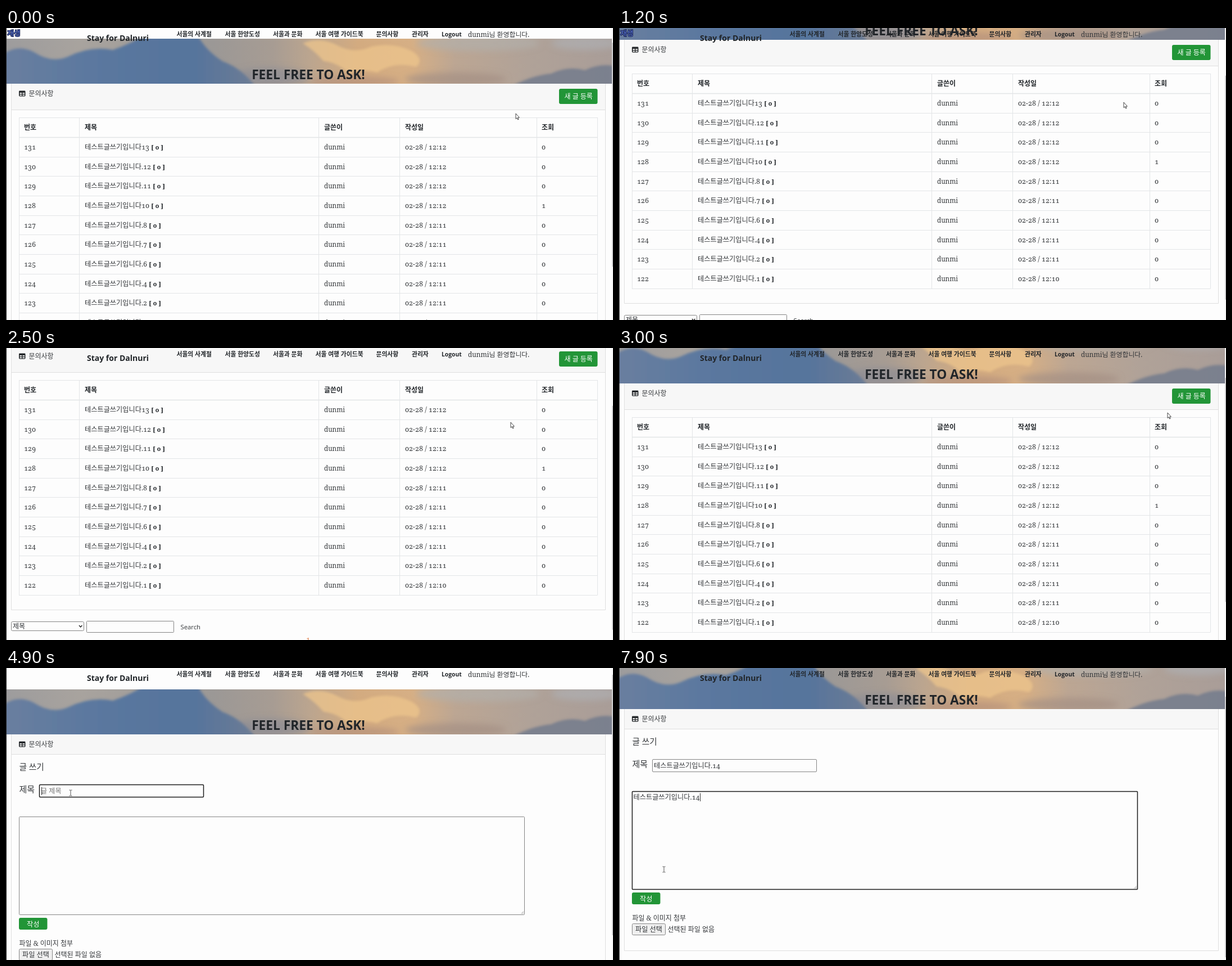
Write an HTML page that moves like this. It is 1080 px wide and 519 px high and loops after 8000 ms.

```html
<!DOCTYPE html>
<html lang="ko">
<head>
<meta charset="utf-8">
<title>문의사항</title>
<style>
  html, body { margin: 0; width: 100%; height: 100%; overflow: hidden; background: #fdfdfd; }
  svg { display: block; width: 100%; height: 100%; }
  text { fill: #34373a; font: 12.2px "Noto Serif", "Noto Sans CJK KR", serif; font-variant-numeric: oldstyle-nums; }
  .sans { font-family: "Open Sans", "Noto Sans CJK KR", sans-serif; }
  .bold { font-weight: 700; fill: #212529; }
  .white { fill: #fff; }
  .hint { fill: #757575; }
  .accent { fill: #e0733a; }
  .line { stroke: #e3e5e7; fill: none; }
  .card { stroke: #dfdfdf; fill: none; }
  .field { stroke: #858585; fill: #fdfdfd; }
  .focus { stroke: #1c1c1c; stroke-width: 1.5; }
  .button { fill: #229537; }
</style>
</head>
<body>
<svg id="stage" viewBox="0 0 1080 519">
  <defs>
    <linearGradient id="sky">
      <stop offset="0" stop-color="#9d9c9d"/><stop offset=".12" stop-color="#a8a39e"/>
      <stop offset=".34" stop-color="#9b9896"/><stop offset=".44" stop-color="#a79c93"/>
      <stop offset=".5" stop-color="#bba58f"/><stop offset=".58" stop-color="#d3ab80"/>
      <stop offset=".67" stop-color="#d6af85"/><stop offset=".74" stop-color="#bca693"/>
      <stop offset=".86" stop-color="#b0a298"/><stop offset="1" stop-color="#a99d98"/>
    </linearGradient>
    <linearGradient id="blue">
      <stop offset="0" stop-color="#6a7f9f"/><stop offset=".35" stop-color="#5b789f"/>
      <stop offset=".75" stop-color="#56749c"/><stop offset="1" stop-color="#6d7c94"/>
    </linearGradient>
    <filter id="soft" x="-30%" y="-60%" width="160%" height="220%"><feGaussianBlur stdDeviation="6"/></filter>
    <filter id="edge"><feGaussianBlur stdDeviation="2"/></filter>
    <clipPath id="heroBox"><rect x="1" y="38" width="1077" height="80"/></clipPath>
  </defs>
  <g id="list"></g>
  <g id="write"></g>
  <g id="nav"></g>
  <rect width="1" height="519" fill="#222"/>
  <rect x="1078" width="2" height="519" fill="#f1f1f1"/>
  <rect id="thumb" x="1078.5" width="1.5" fill="#bfc0c2"/>
  <path id="arrow" d="M0 0V9.6L2.2 7.7L3.7 11L5.1 10.4L3.7 7.2H6.4Z" fill="#fff" stroke="#333" stroke-width=".9"/>
  <path id="beam" d="M-2.5 -5H-.6L0 -4.4L.6 -5H2.5M0 -4.4V4.4M-2.5 5H-.6L0 4.4L.6 5H2.5" fill="none" stroke="#555"/>
</svg>
<script>
const LOOP = 8000, STEP = 100, SWITCH = 3400;
const $ = id => document.getElementById(id);

const text = (x, y, str, size = 12, cls = "", extra = "") =>
  `<text x="${x}" y="${y}" class="${cls}" style="font-size:${size}px" ${extra}>${str}</text>`;
const box = (x, y, w, h, cls, extra = "") =>
  `<rect x="${x}" y="${y}" width="${w}" height="${h}" class="${cls}" ${extra}/>`;
const path = (d, cls, extra = "") => `<path d="${d}" class="${cls}" ${extra}/>`;
const cloud = (x, y, rx, ry, fill, opacity = .8) =>
  `<ellipse cx="${x}" cy="${y}" rx="${rx}" ry="${ry}" fill="${fill}" opacity="${opacity}"/>`;

const hero = `<g clip-path="url(#heroBox)">
  ${box(0, 38, 1080, 80, "", 'fill="url(#sky)"')}
  <g transform="translate(0 38)">
    <g filter="url(#soft)">
      ${cloud(470, 68, 70, 16, "#8c8c94", .7)}
      ${cloud(620, 76, 80, 9, "#b28f7c", .7)}
      ${cloud(840, 8, 110, 14, "#b3afaa", .7)}
      ${cloud(800, 72, 90, 12, "#a48f84", .7)}
      ${cloud(1030, 8, 60, 12, "#aeb0b2", .7)}
    </g>
    <g filter="url(#edge)">
      ${path("M-9 30Q20 8 50 24Q80 44 110 32Q150 12 190 20Q225 8 250 -9H340Q352 18 385 40Q420 52 448 90H-9Z", "", 'fill="url(#blue)"')}
      ${path("M528 8Q560 -4 590 12T650 14Q690 6 722 22Q745 36 730 50Q690 40 660 60Q630 52 610 62Q590 42 565 40Q550 22 528 8Z", "", 'fill="#ecc48d" opacity=".75"')}
      ${path("M890 90Q930 66 970 62Q1000 48 1030 56Q1060 42 1090 50V90Z", "", 'fill="#747c8c" opacity=".85"')}
    </g>
  </g></g>
  ${text(538, 110, "FEEL FREE TO ASK!", 22.7, "sans bold", 'text-anchor="middle"')}`;

function card(headEnd, bottom) {
  return box(9.5, 118.5, 1057, headEnd - 118, "", 'fill="#f7f7f7"')
    + path(`M9.5 118V${bottom}H1066.5V118M9.5 ${headEnd + .5}H1066.5`, "card")
    + box(23, 130.5, 11.5, 10, "", 'rx="1.4" fill="#25282b"')
    + path("M24.6 134H28.1V136H24.6ZM29.5 134H33V136H29.5ZM24.6 137.2H28.1V139.2H24.6ZM29.5 137.2H33V139.2H29.5Z", "", 'fill="#f7f7f7"')
    + text(40.5, 139.5, "문의사항");
}

function listPage() {
  const cols = [32, 140, 566, 710, 953];
  const tails = ["13", ".12", ".11", "10", ".8", ".7", ".6", ".4", ".2", ".1"];
  const rowY = i => Math.round(213 + 34.65 * i) + .5;
  let out = hero + card(164, 586.5)
    + box(984, 127, 68.5, 27, "button", 'rx="3"') + text(993.5, 145, "새 글 등록", 12, "white");
  ["번호", "제목", "글쓴이", "작성일", "조회"].forEach((label, i) =>
    out += text(cols[i], 199.5, label, 12, "bold"));
  tails.forEach((tail, i) => {
    const minute = i < 4 ? 12 : i < 9 ? 11 : 10;
    const y = rowY(i) + 21.5;
    const title = `테스트글쓰기입니다${tail} <tspan class="bold" style="font-size:11.2px">[ 0 ]</tspan>`;
    [131 - i, title, "dunmi", `02-28 / 12:${minute}`, i === 3 ? 1 : 0].forEach((cell, c) =>
      out += text(cols[c], y, cell, c === 2 ? 11.7 : 12.2));
    out += path(`M23 ${rowY(i + 1)}H1052.5`, "line");
  });
  out += path("M23 178.5H1052.5" + [23.5, 130.5, 556.5, 700.5, 944.5, 1052.5].map(x => `M${x} 178V560`).join(""), "line");
  out += path("M23 213.5H1052.5", "line", 'stroke-width="1.6"');
  return out
    + box(9.5, 607.5, 129, 16, "field", 'rx="2"') + text(12, 620, "제목")
    + path("M130 614L132.7 617L135.4 614", "", 'fill="none" stroke="#222" stroke-width="1.4"')
    + box(143.5, 606.5, 155, 20, "field", 'rx="1"')
    + text(310.5, 621, "Search", 11.3, "sans", 'font-weight="500"')
    + text(534, 643, "1", 12, "accent");
}

function writePage() {
  return hero + card(153, 547.5)
    + text(23.5, 181, "글 쓰기", 14.7) + text(23.5, 221, "제목", 15)
    + box(59.5, 207.5, 292, 22, "field", 'id="titleBox" rx="1.5"')
    + text(62, 222.5, "글 제목", 12.1, "hint", 'id="hint"')
    + text(62, 222.5, "", 12.2, "", 'id="titleText"')
    + box(23.5, 264.5, 899, 174, "field", 'id="bodyBox" rx="1"')
    + path("M916.5 437L921 432.5M919 437L921 435", "", 'stroke="#888" stroke-width=".8"')
    + text(25.5, 278.5, "", 12.2, "", 'id="bodyText"')
    + box(0, 0, 1, 14.5, "", 'id="caret" fill="#333"')
    + box(23, 444, 50.5, 21, "button", 'rx="3"') + text(37, 460, "작성", 12.2, "white")
    + text(23.5, 494, "파일 &amp; 이미지 첨부")
    + box(23.5, 499.5, 59, 20, "", 'rx="2" fill="#efefef" stroke="#858585"')
    + text(29, 513.5, "파일 선택", 12.2) + text(86.5, 513.5, "선택된 파일 없음", 12);
}

function navBar() {
  const items = [[303.5, "서울의 사계절"], [389.5, "서울 한양도성"], [475, "서울과 문화"], [550.5, "서울 여행 가이드북"],
    [658.5, "문의사항"], [722, "관리자"], [775, "Logout"]];
  return text(144, 23, "Stay for Dalnuri", 14, "sans bold")
    + items.map(([x, label]) => text(x, 15, label, label === "Logout" ? 10.3 : 10.8, "sans bold")).join("")
    + text(822, 16.3, "dunmi님 환영합니다.", 11.9)
    + text(2.5, 14, "재생", 12.5, "sans", 'id="badge" font-weight="700" stroke="#1b2450" stroke-width="2" paint-order="stroke"');
}

$("list").innerHTML = listPage();
$("write").innerHTML = writePage();
$("nav").innerHTML = navBar();
$("badge").style.fill = "#5b78dc";

// Tables of [time, value...]; values in between are linear.
const listScroll = [[0, 19], [300, 42], [600, 72], [900, 86], [1000, 88], [1200, 97], [1700, 122], [2400, 122],
  [2500, 121], [2700, 98], [3000, 55], [3300, 19]];
const writeScroll = [[7400, 0], [7500, 6], [7700, 30], [7800, 40], [7900, 45]];
const pointer = [[0, 907, 152], [1000, 898, 132], [2500, 898, 132], [3000, 976, 115], [3300, 1008, 118],
  [3500, 1008, 118], [4000, 115, 222], [7400, 115, 222], [7900, 80, 358]];

// Tables of [start, value]; each value holds until the next.
const base = "테스트글쓰기입니다.";
const titleSteps = [[0, ""], [5200, base + "4"], [5800, base], [5900, base + "1"], [6000, base + "14"]];
const bodySteps = [[0, ""], [6400, base + "4"], [7000, base], [7100, base + "1"], [7200, base + "14"]];
const focusSteps = [[0, ""], [4200, "title"], [6200, "body"]];
const caretSteps = [[0, 0], [4200, 1], [4500, 0], [4900, 1], [5500, 0], [5800, 1], [6800, 0], [7000, 1]];

function mix(table, t) {
  const i = table.findIndex(row => row[0] > t);
  if (i === 0) return table[0].slice(1);
  if (i < 0) return table[table.length - 1].slice(1);
  const a = table[i - 1], b = table[i], k = (t - a[0]) / (b[0] - a[0]);
  return a.slice(1).map((v, n) => v + (b[n + 1] - v) * k);
}
const hold = (table, t) => table.filter(row => row[0] <= t).pop()[1];
const show = (id, on) => $(id).setAttribute("visibility", on ? "inherit" : "hidden");
const move = (id, x, y) => $(id).setAttribute("transform", `translate(${x} ${y})`);

function draw(t) {
  const writing = t >= SWITCH;
  const scroll = Math.round(mix(writing ? writeScroll : listScroll, t)[0]);
  show("list", !writing);
  show("write", writing);
  move(writing ? "write" : "list", 0, -scroll);
  $("thumb").setAttribute("y", 12 + scroll * (writing ? .87 : .75));
  $("thumb").setAttribute("height", writing ? 463 : 398);
  show("badge", t < 1500);

  const title = hold(titleSteps, t), focus = hold(focusSteps, t);
  $("titleText").textContent = title;
  $("bodyText").textContent = hold(bodySteps, t);
  show("hint", !title);
  for (const name of ["title", "body"]) $(name + "Box").classList.toggle("focus", focus === name);
  show("caret", writing && focus && hold(caretSteps, t));
  if (focus) {
    const field = $(focus + "Text");
    const width = field.textContent ? field.getComputedTextLength() : 0;
    move("caret", Math.round(+field.getAttribute("x") + width + .5), focus === "title" ? 211.5 : 267.5);
  }

  const [x, y] = mix(pointer, t).map(Math.round), inField = t >= 4000;
  show("arrow", !inField);
  show("beam", inField);
  move(inField ? "beam" : "arrow", x, y);
}

const start = performance.now();
function tick() {
  const t = (performance.now() - start) % LOOP;
  draw(Math.floor(t / STEP) * STEP);
  requestAnimationFrame(tick);
}
tick();
</script>
</body>
</html>
```
